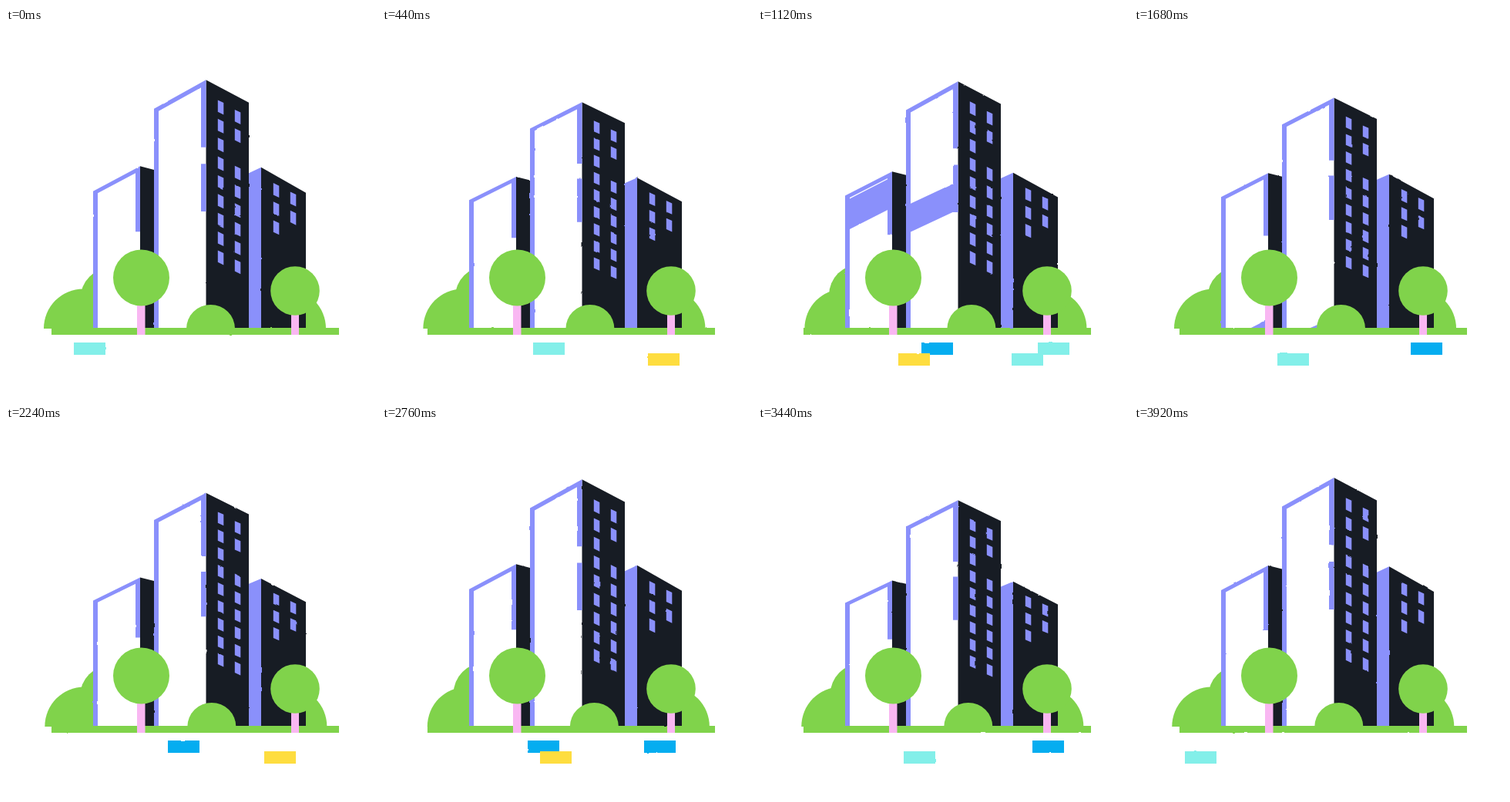
An HTML page that plays this animation: 480 by 480 pixels, repeating every 4000 ms.

```html
<!DOCTYPE html>
<html lang="en">
<head>
<meta charset="utf-8">
<title>City blocks</title>
<style>
  html, body { margin: 0; width: 100%; height: 100%; overflow: hidden; background: #fff; }
  svg { display: block; width: 100vw; height: 100vh; }
  .dark { fill: #171c24; }
  .violet { fill: #8a90fb; }
  .green { fill: #80d34b; }
  .pink { fill: #f9b7f2; }
  .white { fill: #fff; }
  .rough { filter: url(#rough); }
</style>
</head>
<body>
<svg viewBox="0 0 480 480">
  <defs>
    <filter id="rough" filterUnits="userSpaceOnUse" x="0" y="0" width="480" height="480" color-interpolation-filters="sRGB">
      <feTurbulence id="noise" type="fractalNoise" baseFrequency="0.08" numOctaves="2" result="n"/>
      <feDisplacementMap in="SourceGraphic" in2="n" scale="1.9" xChannelSelector="R" yChannelSelector="G"/>
    </filter>
    <clipPath id="leftFace"><path d="M114 211L174 179V389H114Z"/></clipPath>
    <clipPath id="towerFace"><path d="M193 104L259.500 67V389H193Z"/></clipPath>
  </defs>
  <rect class="white" width="480" height="480"/>
  <circle id="lobe" class="green" cx="136.500" cy="351" r="40"/>
  <g class="green sway">
    <path d="M49 390a51 51.500 0 0 1 102 0Z"/>
    <path d="M312 390a51.500 51.500 0 0 1 103 0Z"/>
  </g>

  <g class="rough">
    <g class="side">
      <path class="violet" d="M315 188L331 180.500V389H315Z"/>
      <path class="dark" d="M331 180.500L389 213.500V389H331Z"/>
      <g id="rightWindows" class="violet"></g>
    </g>

    <g class="side">
      <path class="dark" d="M174 179L193 184V389H174Z"/>
      <path class="white" d="M114 211L174 179V389H114Z"/>
      <path id="leftBand" class="violet" clip-path="url(#leftFace)"/>
      <path class="violet" d="M113 211.500L174 179V264H168V188L119 214V389H113Z"/>
    </g>

    <g id="tower">
      <path class="dark" d="M259.300 67L315 96.500V389H259.300Z"/>
      <path class="white" d="M193 104L259.300 67V389H193Z"/>
      <path id="towerBand" class="violet" clip-path="url(#towerFace)"/>
      <path class="violet" d="M192 104.500L259.500 67V154.500H253V77L198 107.500V389H192ZM253 176H259.500V238H253Z"/>
      <g id="towerWindows" class="violet"></g>
    </g>

    <path class="green" d="M59 389H432V398H59Z"/>
    <g id="dashes"></g>
  </g>

  <path class="green sway" d="M234 390a31.500 31 0 0 1 63 0Z"/>
  <path class="pink" d="M170 355H180.500V398H170ZM370 368H380V398H370Z"/>
  <circle class="green" cx="175.500" cy="324" r="36.500"/>
  <circle class="green" cx="375" cy="341" r="31.800"/>
</svg>
<script>
const LOOP = 4000, STEP = 40, GROUND = 389;
const BEAT = LOOP / 3, SWAY = LOOP / 2;
const CYAN = '#83efe9', YELLOW = '#fedd3f', BLUE = '#05adf0';
const el = id => document.getElementById(id);
const all = sel => [...document.querySelectorAll(sel)];

// Upper lane runs right, lower lane runs left: colour, time and x, later time and x.
const lanes = [
  { y: 408, from: 87, to: 403, cars: [
    [CYAN, 0, 88, 1120, 363],
    [BLUE, 1120, 212, 1680, 359],
    [BLUE, 1760, 90, 2760, 340],
    [BLUE, 2760, 189, 3440, 356]
  ] },
  { y: 422, from: 55, to: 347, cars: [
    [YELLOW, 440, 345, 1120, 182],
    [CYAN, 1120, 329, 1680, 186],
    [YELLOW, 2200, 345, 2760, 205],
    [CYAN, 3440, 189, 3920, 66]
  ] }
];

const cars = lanes.flatMap(({ y, from, to, cars }) => cars.map(([fill, t0, x0, t1, x1]) => {
  const node = document.createElementNS('http://www.w3.org/2000/svg', 'rect');
  Object.entries({ y, fill, width: 41, height: 16 }).forEach(([k, v]) => node.setAttribute(k, v));
  el('dashes').append(node);
  return { node, from, to, x: t => x0 + (x1 - x0) * (t - t0) / (t1 - t0) };
}));

function addWindows(id, x, y, gap, rows) {
  const d = rows.map(r => `M${x} ${y + gap * r}l7.5 3.6v15.4l-7.5 -3.6Z`).join('');
  el(id).insertAdjacentHTML('beforeend', `<path d="${d}"/>`);
}
addWindows('towerWindows', 274.8, 93.2, 24.4, [0, 1, 2, 3, 4, 5, 6, 7, 8]);
addWindows('towerWindows', 296.8, 105.7, 24.3, [0, 1, 3, 4, 5, 6, 7, 8]);
addWindows('rightWindows', 346.8, 200.8, 24.2, [0, 1, 2]);
addWindows('rightWindows', 368.8, 212.3, 24.2, [0, 1]);

// Distance from the rest phase: 0 at rest, 1 half a cycle away.
function swing(t, period, rest) {
  const p = t / period - rest;
  return 2 * Math.abs(p - Math.round(p));
}
const sine = x => (1 - Math.cos(Math.PI * x)) / 2;
const strong = x => x < .5 ? .5 * (2 * x) ** 2.5 : 1 - .5 * (2 - 2 * x) ** 2.5;

function squash(node, s) {
  node.setAttribute('transform', `translate(0 ${GROUND * (1 - s)}) scale(1 ${s})`);
}
function band(id, x, y, width, height, slope) {
  const rise = width * slope;
  el(id).setAttribute('d', `M${x} ${y}l${width} ${-rise}v${height}l${-width} ${rise}Z`);
}

const sides = all('.side'), swayers = all('.sway');

function draw(t) {
  squash(el('tower'), 1 - .1 * strong(swing(t, BEAT, .955)));
  const side = 1 - .104 * sine(swing(t, BEAT, .035));
  sides.forEach(n => squash(n, side));

  const sway = sine(swing(t, SWAY, .01));
  swayers.forEach(n => n.setAttribute('transform', `translate(${11.7 * sway} 0)`));
  el('lobe').setAttribute('transform', `translate(${-4.5 * sway} ${-4.5 * sway})`);

  band('towerBand', 197, 227 + .316 * (t - 1120), 64, 37, .47);
  band('leftBand', 119, 215.5 + .341 * (t - 1120), 56, 41, .53);

  for (const c of cars) {
    const x = c.x(t);
    c.node.setAttribute('x', x);
    c.node.setAttribute('visibility', x >= c.from && x <= c.to ? 'visible' : 'hidden');
  }
  el('noise').setAttribute('seed', 1 + Math.floor(t / 160));
}

let last = -1;
const start = performance.now();
function tick() {
  const time = (performance.now() - start) % LOOP;
  const t = time < 120 ? 0 : Math.floor(time / STEP) * STEP;
  if (t !== last) draw(last = t);
  requestAnimationFrame(tick);
}
tick();
</script>
</body>
</html>
```
